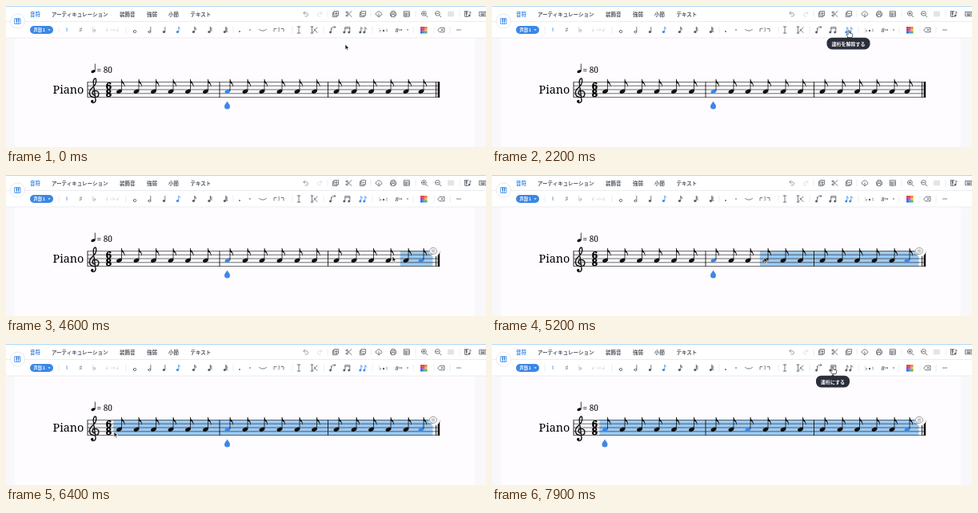
These frames come from a looping animation (600 by 177 pixels, 8 s). An HTML page:

```html
<!DOCTYPE html>
<html lang="ja">
<meta charset="utf-8">
<title>連桁</title>
<style>
html, body { margin: 0; width: 100%; height: 100%; overflow: hidden; background: #fff }
svg { display: block; width: 600px; height: 177px }
text { font-family: "Noto Sans CJK JP", "Noto Sans CJK", sans-serif; font-size: 6.5px }
.serif { font-family: "Noto Serif", serif }
.sym { font-family: "DejaVu Sans", sans-serif }
.icon { fill: none; stroke: currentColor; stroke-width: .8; stroke-linejoin: round; stroke-linecap: round }
.solid { fill: currentColor }
</style>
<svg viewBox="0 0 600 177">
  <defs>
    <ellipse id="head" rx="3.6" ry="2.3" transform="rotate(-24)"/>
    <path id="stem" d="M3,-1V-15.5" stroke="#111" stroke-width=".8"/>
    <path id="flag" d="M3,-15.5C3.4,-12 8.4,-10.2 6.6,-4.8C7,-8 5.2,-10.2 3,-10.8Z"/>
  </defs>

  <rect y="40" width="600" height="137" fill="#f8f8fa"/>
  <rect x="11" y="40" width="574.5" height="137" fill="#fefcff"/>
  <rect width="600" height="40" fill="#fff"/>
  <rect width="600" height="1" fill="#b0d8f6"/>
  <path d="M0,19.5H600M0,40H600" stroke="#e6e8ec" stroke-width=".8"/>
  <g id="bar"></g>

  <g id="score">
    <rect id="sel" y="95" height="20" fill="#9bcaf4"/>
    <path d="M102,95.5H542M102,100.2H542M102,105H542M102,109.8H542M102,114.5H542" stroke="#3a3a3a" stroke-width=".75"/>
    <path id="lines" stroke="#111" stroke-width=".9"/>
    <rect x="539.6" y="95" width="2.6" height="20" fill="#111"/>
    <text class="serif" x="58.5" y="110" style="font-size:14.3px">Piano</text>
    <text class="serif" x="113.5" y="83.5" style="font-size:10px">= 80</text>
    <use href="#head" transform="translate(109 82.2) scale(.75)"/>
    <path d="M111.3,82V72.5" stroke="#111" stroke-width=".8"/>
    <g text-anchor="middle" font-weight="900" stroke="#000" stroke-width=".5">
      <text class="serif" x="128.3" y="104.6" style="font-size:12.8px">6</text>
      <text class="serif" x="128.3" y="114.4" style="font-size:12.8px">8</text>
    </g>
    <path d="M110.6,112C107,111.3 107.3,106.2 111,106.2C117.6,106.3 117.6,114.5 110.6,114.7C103.4,114.5 102.8,107.5 107,103.5C110.6,100 113.8,97.3 112.4,91.6C111.4,89.4 108.8,92.6 109.2,96.5L112,117.5C112.3,122 107.4,122.8 106.6,119.6" fill="none" stroke="#111" stroke-width="1.4"/>
    <circle cx="107.8" cy="119.4" r="1.6"/>
    <g id="notes"></g>
    <path id="beam" d="M283.6,90.5H301.5V92.8H283.6Z"/>
    <path id="drop" d="M0,-5.6C1,-3.2 3.5,-1.7 3.5,1A3.5,3.5 0 0 1 -3.5,1C-3.5,-1.7 -1,-3.2 0,-5.6Z" fill="#3f86e8"/>
    <g id="bubble" stroke="#7d8289" stroke-width=".8">
      <circle cx="535.5" cy="95.5" r="6.8" fill="#fefcff" stroke="none"/>
      <path d="M531.5,98L530.6,100.6L534,99.2" fill="#fff"/>
      <ellipse cx="534" cy="95.3" rx="4.6" ry="4" fill="#fff"/>
      <path d="M531.7,94.3H536.4M531.7,96.3H536.4"/>
    </g>
  </g>

  <g id="tip">
    <path d="M-3,41L0,38L3,41Z" fill="#2b2f3a"/>
    <rect id="tipBox" y="39.7" height="14.8" rx="6.5" fill="#2b2f3a"/>
    <text id="tipText" y="49.5" text-anchor="middle" fill="#fff" font-weight="700" style="font-size:6px"></text>
  </g>
  <g id="cursor" stroke-width=".7" stroke-linejoin="round">
    <path id="arrow" d="M0,0V6.8L1.5,5.4L2.6,7.8L3.8,7.3L2.7,5H4.8Z" fill="#111" stroke="#fff"/>
    <path id="hand" d="M-.9,0Q0,-.9 .9,0V3L4,3.6Q5,4 4.8,5L4.1,8.5H-.8L-3.2,5Q-3,4 -2,4.2L-.9,5.2Z" fill="#fff" stroke="#222"/>
  </g>
</svg>
<script>
const $ = id => document.getElementById(id);
const BLUE = '#3b87e6', DARK = '#555b66', FAINT = '#d9dbe0';

// ---- toolbar ----
let bar = '';
const label = (x, y, s, color = DARK, attrs = '') =>
  bar += `<text x="${x}" y="${y}" fill="${color}" ${attrs}>${s}</text>`;
const icon = (x, y, d, color = DARK, solid = '', id = '') =>
  bar += `<g transform="translate(${x} ${y})" color="${color}" ${id && `id="${id}"`}>` +
    `<path class="icon" d="${d}"/><path class="solid" d="${solid}"/></g>`;
const dot = (x, y, r = 1.4) => `M${x - r},${y}a${r},${r} 0 1 0 ${2 * r},0a${r},${r} 0 1 0 ${-2 * r},0Z`;

[[30, '音符', BLUE], [57, 'アーティキュレーション'], [142, '装飾音'], [176, '強弱'], [203, '小節'], [230.5, 'テキスト']]
  .forEach(([x, s, c]) => label(x, 12.6, s, c, 'font-weight="700"'));

bar += '<circle cx="14.5" cy="19" r="9" fill="#fff" stroke="#e6e9ee"/>';
icon(14.5, 19, 'M-3.5,-3.3H3.5V3.3H-3.5ZM-1.2,0V3.3M1.2,0V3.3', BLUE, 'M-2,-3.3h1.6v4h-1.6ZM.4,-3.3h1.6v4h-1.6Z');
bar += `<rect x="30" y="25" width="29" height="10" rx="5" fill="${BLUE}"/>`;
label(34.5, 32, '声部 1', '#fff', 'font-weight="700" style="font-size:5.2px"');
icon(54, 30, '', '#fff', 'M-1.5,-.7H1.5L0,1Z');

const seps = (y, xs) => xs.forEach(x => icon(x, y, 'M0,-4V4', '#e6e8ec'));
seps(10, [402, 456, 512, 567]);
seps(30, [66, 150, 284, 358, 397, 458, 509, 535, 555]);

icon(375, 10, 'M-1,-3L-3.2,-1.2L-1,.8M-3,-1.2H1A2.2,2.2 0 0 1 1,3H-1', '#8b9099');
icon(392, 10, 'M1,-3L3.2,-1.2L1,.8M3,-1.2H-1A2.2,2.2 0 0 0 -1,3H1', FAINT);
const copy = 'M-1.8,-3.4H3.6V2H-1.8ZM-1.8,-1.6H-3.6V3.6H1.8V2M-.6,-.7H2.4';
icon(412, 10, copy + 'M.9,-2.2V.8');
icon(429, 10, 'M-1.8,1.2L3,-3.5M-1.8,-1.2L3,3.5' + dot(-2.7, -2, 1.1) + dot(-2.7, 2, 1.1));
icon(446, 10, copy);
icon(466, 10, 'M-1.8,2H-2.4A2,2 0 0 1 -2.5,-1.8A2.8,2.8 0 0 1 2.6,-1.3A1.7,1.7 0 0 1 2.5,2H1.8M0,-.3V3.8M-1.3,2.6L0,3.9L1.3,2.6');
icon(484, 10, 'M-2,-1.3V-3.5H2V-1.3M-2,2H-3.5V-1.3H3.5V2H2M-2,.6H2V3.6H-2Z');
icon(501, 10, 'M-3.3,-3.3H3.3V3.3H-3.3ZM-3.3,-1H3.3M-3.3,1.2H3.3M-1,-1V3.3');
const lens = 'M1.6,1.6L3.9,3.9' + dot(-.6, -.6, 2.9) + 'M-1.9,-.6H.7';
icon(523, 10, lens + 'M-.6,-1.9V.7');
icon(540, 10, lens);
icon(556, 10, 'M-3,-3V3M-1,-3V3M1,-3V3M3,-3V3', '#b9bdc4');
icon(577, 10, 'M-3.5,-3.3H1M-3.5,-3.3V3.3H.5M-1.3,0V3.3M3,2V-3L4.2,-1.8', DARK, 'M-2.2,-3.3h1.7v4h-1.7Z' + dot(2, 2.2, 1.2));
icon(596, 10, 'M-4,-2.7H4V2.7H-4ZM-2.5,-1H2.5M-2.5,.4H2.5M-1.5,1.7H1.5');

[[76, '♮', BLUE], [93.5, '♯'], [110, '♭']].forEach(([x, s, c]) =>
  label(x, 33, s, c, 'class="sym" text-anchor="middle" style="font-size:9px"'));
icon(133, 30, 'M-6.5,1V-2M-2.5,0H3M1.6,-1.3L3,0L1.6,1.3M7,1V-2', FAINT, dot(-7, 1, 1.1) + dot(6, 1, 1.1));

// note values: stem and a growing number of flags
icon(161, 32, dot(0, 0, 1.7));
icon(180, 30, dot(-.6, 2.5) + 'M.8,2.5V-3.5');
[198, 215, 235, 254.5, 274].forEach((x, i) => {
  let d = 'M.8,2.5V-3.5';
  for (let k = 0; k < i; k++) d += `M.8,${-3.5 + k * 1.5}l2,1.8`;
  icon(x, 30, d, i == 1 ? BLUE : DARK, dot(-.6, 2.5, 1.6));
});
icon(293, 31, '', DARK, dot(-1, 1, .9));
icon(305, 30, '', DARK, 'M-1.3,-.5H1.3L0,1Z');
icon(321, 30, 'M-4.5,-.5Q0,3 4.5,-.5');
icon(341, 30, 'M-6,2V-1.5H-3M6,2V-1.5H3');
label(341, 32, '3', DARK, 'text-anchor="middle" style="font-size:5.5px"');
icon(366, 30, 'M-1.8,-4H1.8M0,-4V4M-1.8,4H1.8');
icon(385, 30, 'M-4,-4H-1M-2.5,-4V4M-4,4H-1M-1,2.5L4,-3M0,-1L4,3.5');
icon(408, 30, 'M-1.5,3V-2.5L0,-1M0,-3.5H4M2.7,-4.6L4,-3.5L2.7,-2.4', DARK, dot(-2.5, 3, 1.4));
icon(426, 30, 'M-2.2,3V-3.4H3.8V3M-2.2,-1.8H3.8', DARK, dot(-3.3, 3, 1.4) + dot(2.7, 3, 1.4), 'join');
icon(446, 30, 'M-2.2,3V-3.4L-.4,-1M2.8,3V-3.4L4.8,-1', DARK, dot(-3.3, 3, 1.4) + dot(1.7, 3, 1.4), 'split');
label(468, 33, '♭', DARK, 'class="sym" text-anchor="middle" style="font-size:8px"');
icon(472, 30, '', DARK, dot(0, 1, 1.2));
label(476, 33, '♮', DARK, 'class="sym" text-anchor="middle" style="font-size:7px"');
label(486.5, 32.5, '8<tspan dy="-1.5" style="font-size:4px">va</tspan>', DARK, 'class="serif" font-style="italic" font-weight="700" style="font-size:7px"');
icon(502, 30, '', DARK, 'M-1.3,-.5H1.3L0,1Z');
['#e8403c', '#ea4a3c', '#f0803c', '#7a4fd8', '#e6508c', '#f2c230', '#3c62e6', '#3b9de8', '#4cb860'].forEach((c, i) =>
  bar += `<rect x="${518 + i % 3 * 2.8}" y="${26 + (i / 3 | 0) * 2.8}" width="2.9" height="2.9" fill="${c}"/>`);
icon(544, 30, 'M-4,0L-1.7,-2.8H4V2.8H-1.7ZM0,-1.2L2.4,1.2M2.4,-1.2L0,1.2');
icon(566, 30, '', DARK, dot(-2, 0, .7) + dot(0, 0, .7) + dot(2, 0, .7));
$('bar').innerHTML = bar;

// ---- score ----
const LOOSE = [141.5, 163, 184.5, 206, 227.5, 249.5, 277, 299, 320, 342, 364, 385.5, 413, 435, 456.5, 478, 500, 519];
const JOINED = [141.5, 164, 185.5, 207.5, 229.5, 251, 281, 298, 316, 337, 358.5, 380, 409.5, 430.5, 452, 474, 495, 517];
$('notes').innerHTML = LOOSE.map(() => '<g><use href="#head"/><use href="#stem"/><use href="#flag"/></g>').join('');
const notes = [...$('notes').children];

// ---- motion ----
const PATH = [[0, 424, 48], [100, 424, 48], [600, 426, 30], [1400, 427, 30], [1500, 437, 31], [1800, 446, 31],
  [2600, 446, 31], [3200, 518, 85], [4200, 518, 87], [4300, 514, 98], [4600, 483, 102], [5800, 197, 104],
  [6200, 135, 110], [6500, 135, 110], [7300, 424, 33], [7600, 426, 29], [8000, 426, 29]];

function cursorAt(t) {
  const i = PATH.findIndex(p => p[0] > t);
  const [t0, x0, y0] = PATH[i - 1], [t1, x1, y1] = PATH[i], k = (t - t0) / (t1 - t0);
  return [x0 + (x1 - x0) * k, y0 + (y1 - y0) * k];
}
const show = (id, on) => $(id).style.display = on ? '' : 'none';
const place = (el, x, y) => el.setAttribute('transform', `translate(${x} ${y})`);

function draw(t) {
  const joined = t >= 800 && t < 2000, moved = t >= 7700, selecting = t >= 4300;
  const xs = joined ? JOINED : LOOSE;
  const [cx, cy] = cursorAt(t);

  notes.forEach((n, i) => {
    const active = i == (moved ? 0 : 6) || moved && i == 8 || t >= 3300 && i == 17;
    place(n, xs[i], 107.3);
    n.firstChild.setAttribute('fill', active ? BLUE : '#111');
    n.lastChild.style.display = joined && (i == 6 || i == 7) ? 'none' : '';
  });
  $('lines').setAttribute('d', [102, joined ? 271 : 267, joined ? 398 : 402.5, 537.5].map(x => `M${x},95.2V114.8`).join(''));
  show('beam', joined);
  place($('drop'), moved ? 141 : joined ? 280.7 : 276.5, 125);

  show('sel', selecting);
  show('bubble', selecting);
  if (selecting) {
    const reach = Math.min(...PATH.filter(p => p[0] >= 4300 && p[0] <= t).map(p => p[1]), cx);
    const left = LOOSE.find(x => x > reach) - 7.2;
    $('sel').setAttribute('x', left);
    $('sel').setAttribute('width', 533.5 - left);
  }

  $('join').setAttribute('color', joined ? BLUE : DARK);
  $('split').setAttribute('color', t >= 2000 && !moved ? BLUE : DARK);

  const hand = cy < 36 && cx < 452;
  show('hand', hand);
  show('arrow', !hand);
  place($('cursor'), cx, cy);
  show('tip', hand);
  const onJoin = cx < 434, width = onJoin ? 42 : 54;
  place($('tip'), onJoin ? 426 : 445.5, 0);
  $('tipBox').setAttribute('x', -width / 2);
  $('tipBox').setAttribute('width', width);
  $('tipText').textContent = onJoin ? '連桁にする' : '連桁を解除する';
}

const start = performance.now();
function tick() {
  // the screen updates ten times a second
  draw(Math.floor((performance.now() - start) % 8000 / 100) * 100);
  requestAnimationFrame(tick);
}
tick();
</script>
</html>
```
